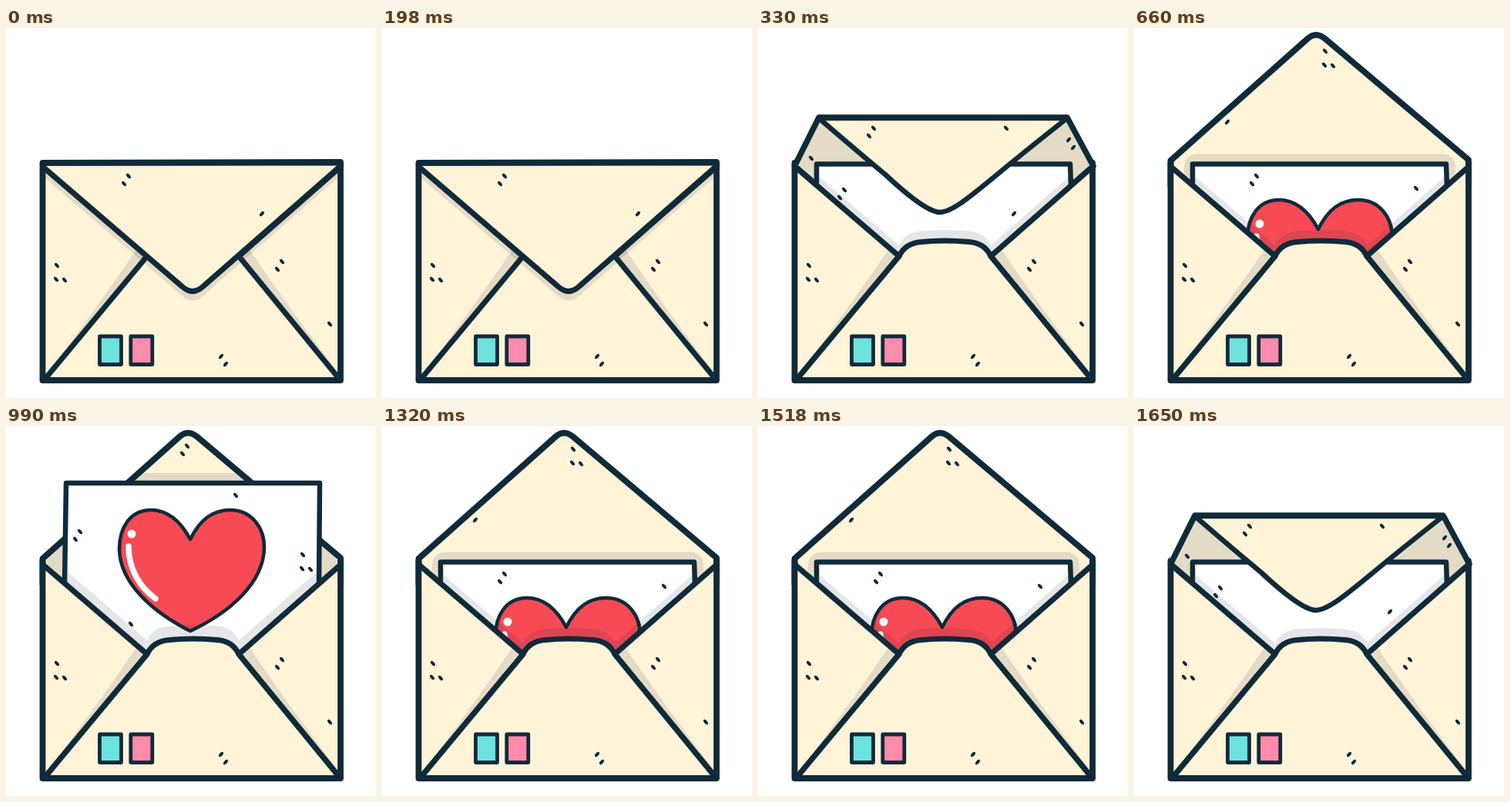
Write an HTML page with a canvas that moves like this. It is 480x480 px and loops after 1980 ms.

```html
<!DOCTYPE html>
<html lang="en">
<head>
<meta charset="utf-8">
<title>Love letter</title>
<style>
  html, body { margin: 0; width: 100%; height: 100%; overflow: hidden; background: #fff; }
  canvas { display: block; width: 480px; height: 480px; }
</style>
</head>
<body>
<canvas id="stage" width="480" height="480"></canvas>
<script>
const ctx = document.getElementById('stage').getContext('2d');
const INK = '#102a39', CREAM = '#fff3d8', RED = '#f74a55';
const SHADE = 'rgba(18,41,58,.115)';
const STEP = 330;

const path = d => new Path2D(d);

function moved(shape, matrix) {
  const out = new Path2D();
  out.addPath(shape, new DOMMatrix(matrix));
  return out;
}
const shift = (shape, dy) => moved(shape, [1, 0, 0, 1, 0, dy]);
const mirror = shape => moved(shape, [-1, 0, 0, 1, 485, 0]);

// Envelope pieces
const SIDES = path('M48 180 L183 296 L50 456 M434 180 L302 296 L433 456');
const LIP = 'L183 296 Q191 279 212 277.5 Q242 274.5 274 277.5 Q294 279 302 296 L';
const BOTTOM = path(`M50 456 ${LIP} 433 456`);
const FRONT = path(`M48 180 ${LIP} 434 180 V457 H48 Z`);
const BODY = path('M47.5 175 V457 H434 V175');
const BOX = path('M47.5 175 L434 174 V457 H47.5 Z');
const FOLD_SHADE = path('M183 296 L170 286 Q126 352 55 446 L50 456 Z');

// Top flap: shut, halfway and raised
const SHUT = path('M49 181 L228 335 Q242 348 256 335 L434 179 V175 H48 Z');
const INSIDE = path('M47.5 179 L79 116 H401 L435 179 L302 296 H183 Z');
const HALF = path('M79 117 Q130 161 165 190 C195 218 222 239 236 239 C251 239 275 219 303 196 Q350 157 401 117 Z');
const RAISED = path('M47.5 205 V172 L225 14 Q236 4 248 14 L434 171 V205 Z');

const HEART = path('M239 147 C224 119 206 109 188 109 C161 109 147 132 147 160 C148 204 190 241 239 266 C290 242 334 204 335 158 C335 130 317 109 291 109 C268 109 252 121 239 147 Z');
const SHINE = path('M159 156 C159 184 172 208 194 224');

// Fleck groups: x, y, count; a negative count mirrors the group
const SPREAD = [[[0, 0]], [[3, -5], [-3, 5]], [[-3, -12], [-4, 6], [7, 7]]];
const ENVELOPE_FLECKS = [[69, 320, 3], [355, 308, 2], [420, 384, 1], [282, 431, -2]];

function fill(shape, color) {
  ctx.fillStyle = color;
  ctx.fill(shape);
}

function line(shape, width, color = INK) {
  ctx.lineWidth = width;
  ctx.strokeStyle = color;
  ctx.stroke(shape);
}

function shadeOn(area, shadow) {
  ctx.save();
  ctx.clip(area);
  fill(shadow, SHADE);
  ctx.restore();
}

function flecks(groups) {
  ctx.fillStyle = INK;
  for (const [x, y, n] of groups) {
    const flip = Math.sign(n);
    for (const [dx, dy] of SPREAD[Math.abs(n) - 1]) {
      ctx.beginPath();
      ctx.ellipse(x + dx * flip, y + dy, 2.1, 3.8, -0.7 * flip, 0, Math.PI * 2);
      ctx.fill();
    }
  }
}

function stamp(x, color) {
  const box = new Path2D();
  box.rect(x, 400, 28, 36.5);
  fill(box, color);
  line(box, 4.8);
}

function heart(dy) {
  ctx.save();
  ctx.translate(0, dy);
  fill(HEART, RED);
  line(HEART, 4.6);
  line(SHINE, 7.5, '#fff');
  ctx.beginPath();
  ctx.arc(163, 140, 5.5, 0, Math.PI * 2);
  ctx.fillStyle = '#fff';
  ctx.fill();
  ctx.restore();
}

// lift: 0 with the letter inside, 1 pulled out
const letterTop = lift => 176.5 - 102.5 * lift;

function letter(lift, showHeart) {
  const edge = `M76 206 L${76 + 2 * lift} ${letterTop(lift)} H${405 + 2 * lift} L406 206`;
  const sheet = path(edge + ' L302 300 H183 Z');
  fill(sheet, '#fff');
  if (showHeart) heart(114 * (1 - lift));
  shadeOn(sheet, shift(FRONT, -14 - 4 * lift));
  line(path(edge), 6.5);
}

function front() {
  fill(SIDES, CREAM);
  for (const shade of [FOLD_SHADE, mirror(FOLD_SHADE)]) shadeOn(SIDES, shade);
  fill(BOTTOM, CREAM);
  line(SIDES, 7);
  line(BOTTOM, 7);
  line(BODY, 7.8);
}

function closed() {
  fill(BOX, CREAM);
  for (const shade of [FOLD_SHADE, mirror(FOLD_SHADE)]) shadeOn(SIDES, shade);
  shadeOn(BOX, shift(SHUT, 12));
  line(SIDES, 7);
  fill(SHUT, CREAM);
  line(SHUT, 7);
  line(BOX, 7.8);
}

function halfOpen() {
  fill(INSIDE, CREAM);
  fill(INSIDE, SHADE);
  line(INSIDE, 7.5);
  letter(0, false);
  fill(HALF, CREAM);
  line(HALF, 6.5);
  front();
}

function open(lift) {
  const margin = 11 + 12 * lift;
  const shadow = new Path2D();
  shadow.roundRect(76 - margin, letterTop(lift) - 13, 330 + 2 * margin, 150, 16);
  fill(RAISED, CREAM);
  shadeOn(RAISED, shadow);
  line(RAISED, 7.8);
  letter(lift, true);
  front();
}

const SHUT_POSE = { paint: closed, marks: [[156, 197, 2], [332, 241, -1]] };
const HALF_POSE = {
  paint: halfOpen,
  marks: [[147, 135, 2], [322, 130, 1], [69, 169, 1], [406, 150, -2], [109, 215, 2], [332, 241, -1]]
};
const RAISED_POSE = {
  paint: () => open(0),
  marks: [[251, 42, 3], [121, 122, -1], [156, 197, 2], [366, 208, 1]]
};
const OUT_POSE = {
  paint: () => open(1),
  marks: [[232, 31, 2], [298, 90, 1], [93, 142, 2], [388, 179, 3], [162, 257, 1]]
};
const CYCLE = [SHUT_POSE, HALF_POSE, RAISED_POSE, OUT_POSE, RAISED_POSE, HALF_POSE];

function draw(pose) {
  ctx.fillStyle = '#fff';
  ctx.fillRect(0, 0, 480, 480);
  ctx.lineCap = ctx.lineJoin = 'round';
  pose.paint();
  stamp(121.5, '#6ee3dd');
  stamp(161.8, '#ff8bad');
  flecks(ENVELOPE_FLECKS);
  flecks(pose.marks);
}

const start = performance.now();
function tick(now) {
  const t = Math.max(0, now - start);
  draw(CYCLE[Math.floor(t / STEP) % CYCLE.length]);
  requestAnimationFrame(tick);
}
tick(start);
</script>
</body>
</html>
```
